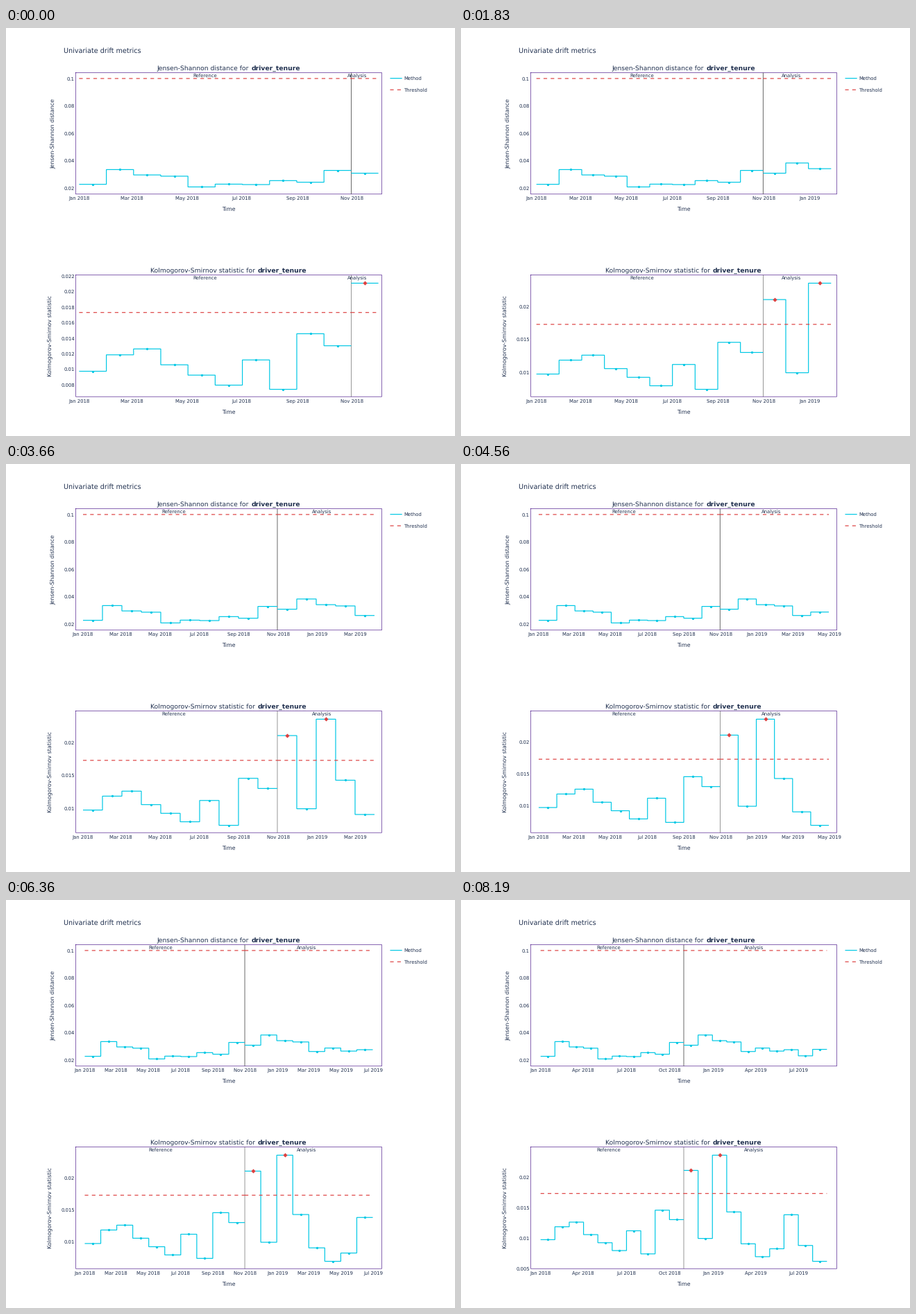
Recreate the animation shown at these times as a matplotlib script. Size 647 px wide and 589 px high, loop 9.09 s.

```python
import numpy as np
import matplotlib.pyplot as plt
from matplotlib.animation import FuncAnimation

W, H, DPI = 647, 589, 64
PT = 72 / DPI
TICK = 30
LOOP = 9090
STARTS = [0, 930, 1830, 2730, 3660, 4560, 5460, 6360, 7290, 8190]

CYAN, RED, PURPLE, INK = "#00c8e5", "#dd4040", "#3b0280", "#20304f"
LEFT, RIGHT = 100.5, 541.5
FIRST_X, LAST_X = 125.0, 517.0
N_REF = 10
CHUNK_DAYS = 30.26
SMALL, LABEL, HEAD, TITLE = 6.9, 8.06, 9.28, 9.65

JS = [.02266, .03342, .02951, .0286, .02074, .02277, .02246, .02535, .02419,
      .03281, .03078, .03824, .03408, .03316, .02617, .0287, .02647, .02748,
      .02302, .02774]
KS = [.00975, .01187, .01263, .01058, .00925, .00796, .01121, .00742, .01459,
      .01304, .02111, .00995, .02361, .0143, .00907, .00696, .00826, .01384,
      .0088, .0062]
JS_LIMIT, KS_LIMIT = .1, .01733

MONTHS = np.arange("2018-01", "2019-12", dtype="datetime64[M]")
DAYS = (MONTHS.astype("datetime64[D]") - np.datetime64("2018-01-01")).astype(int)
NAMES = "Jan Feb Mar Apr May Jun Jul Aug Sep Oct Nov Dec".split()

plt.rcParams.update({
    "font.family": "DejaVu Sans",
    "text.hinting": "none",
    "path.snap": False,
    "lines.scale_dashes": False,
    "lines.solid_capstyle": "butt",
    "lines.solid_joinstyle": "miter",
})

fig = plt.figure(figsize=(W / DPI, H / DPI), dpi=DPI, facecolor="white")
ax = fig.add_axes([0, 0, 1, 1])
ax.set_xlim(0, W)
ax.set_ylim(H, 0)
ax.axis("off")


def text(x, y, s, size=SMALL, ha="center", **kw):
    return ax.text(x, y, s, fontsize=size * PT, color=INK, ha=ha,
                   va="baseline", rotation_mode="anchor", **kw)


def mid_text(x, y, s, **kw):
    """Text whose digits are centred on height y."""
    return text(x, y + 0.365 * SMALL, s, **kw)


def line(x, y, color, width=1.2, **kw):
    return ax.plot(x, y, color=color, lw=width * PT, **kw)[0]


def dashed(x0, x1, y):
    gap = 5.14 * PT
    return line([x0, x1], [y, y], RED, dashes=(gap, gap), dash_capstyle="butt")


def dots(x, y, color, shape, size):
    return ax.plot(x, y, shape, color=color, ms=size * PT, mew=0)[0]


def steps(edges, ys):
    return line(np.repeat(edges, 2)[1:-1], np.repeat(ys, 2), CYAN)


def panel(top, bottom, name, x_name, x_bold, x_side, y_side):
    line([LEFT, RIGHT, RIGHT, LEFT, LEFT], [top, top, bottom, bottom, top],
         PURPLE, 0.6, zorder=1).set_solid_capstyle("projecting")
    text(x_name, top - 3.3, name + " for ", HEAD, "left")
    text(x_bold, top - 3.3, "driver_tenure", HEAD, "left", weight="bold")
    text(x_side, y_side, name, LABEL, rotation=90)
    text(321, bottom + 24.2, "Time", LABEL)


def chart(n, top, bottom, values, to_y, limit, ticks, rule):
    """Everything in one panel that depends on the number of chunks n."""
    width = (LAST_X - FIRST_X) / (n - 1)
    edges = FIRST_X + width * (np.arange(n + 1) - 0.5)
    mids = edges[:n] + width / 2
    vals = np.array(values[:n])
    ys = to_y(vals)
    split = edges[N_REF]
    alert = vals > limit
    out = [
        line([split, split], [top, bottom], "#444444", rule),
        steps(edges[:N_REF + 1], ys[:N_REF]),
        steps(edges[N_REF:], ys[N_REF:]),
        dashed(edges[0], split, to_y(limit)),
        dashed(split, edges[n], to_y(limit)),
        dots(mids[~alert], ys[~alert], CYAN, "o", 3.3),
        dots(mids[alert], ys[alert], RED, "D", 4.4),
    ]

    for word, a, b in (("Reference", 0, N_REF - 1), ("Analysis", N_REF, n - 1)):
        x = (edges[a] + edges[b]) / 2 + 22.5
        out.append(mid_text(x, top + 3.5, word, ha="right"))
    for m in range(0, len(DAYS), 3 if n > 18 else 2):
        x = edges[0] + DAYS[m] * width / CHUNK_DAYS
        if x <= RIGHT:
            label = f"{NAMES[m % 12]} {2018 + m // 12}"
            out.append(mid_text(x - 0.2, bottom + 5.7, label))
    for v in ticks:
        y = to_y(v)
        if top - 0.1 <= y <= bottom + 0.3:
            out.append(mid_text(98.8, y, f"{v:g}", ha="right"))
    return out


def js_y(v):
    return 72.9 + (JS_LIMIT - v) * 1975


def ks_scale(n):
    lo, hi = min(KS[:n]), max(KS[:n])
    return lambda v: 521.6 - (v - lo) / (hi - lo) * 153.2


def stage(n):
    js_ticks = np.arange(1, 6) * 0.02
    ks_ticks = np.arange(3, 13) * 0.002 if n < 13 else np.arange(1, 6) * 0.005
    return (chart(n, 64.5, 239.8, JS, js_y, JS_LIMIT, js_ticks, 0.8)
            + chart(n, 356.5, 532.2, KS, ks_scale(n), KS_LIMIT, ks_ticks, 0.55))


text(83, 36, "Univariate drift metrics", TITLE, "left")
panel(64.5, 239.8, "Jensen-Shannon distance", 217.5, 354, 70, 152)
panel(356.5, 532.2, "Kolmogorov-Smirnov statistic", 208.5, 363, 65, 444)
line([553.5, 570.7], [72.6, 72.6], CYAN)
dashed(553.5, 570.7, 89.2)
mid_text(573, 72.8, "Method", ha="left")
mid_text(573, 89.3, "Threshold", ha="left")

stages = [stage(N_REF + 1 + k) for k in range(len(STARTS))]


def show(i):
    now = np.searchsorted(STARTS, i * TICK, side="right") - 1
    for k, group in enumerate(stages):
        for artist in group:
            artist.set_visible(k == now)
    return stages[now]


anim = FuncAnimation(fig, show, frames=LOOP // TICK, interval=TICK,
                     init_func=lambda: show(0), repeat=True, repeat_delay=0)
plt.show()
```
